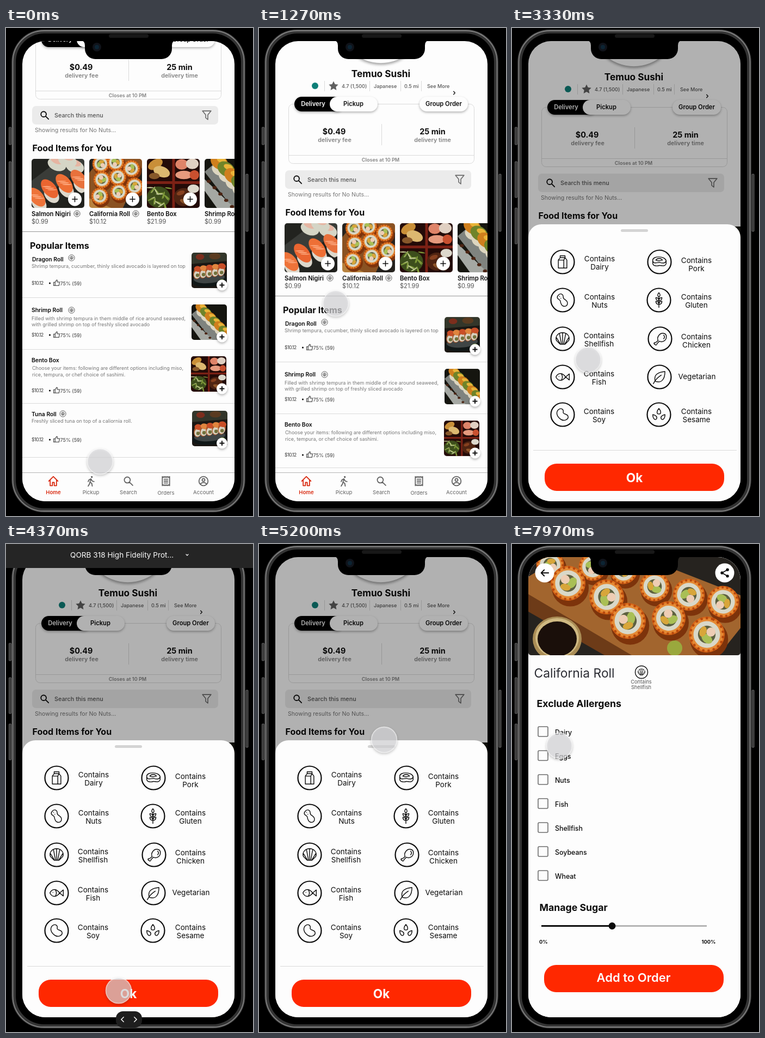
An HTML page that plays this animation: 454x895 px, repeating every 8000 ms.

```html
<!DOCTYPE html>
<html lang="en">
<head>
<meta charset="utf-8">
<title>Food order prototype</title>
<style>
  html, body { margin: 0; width: 100%; height: 100%; overflow: hidden; background: #000; }
  svg { display: block; width: 454px; height: 895px; }
  text { font-family: Inter, "Open Sans", sans-serif; white-space: pre; }
  .raised { filter: drop-shadow(0 2px 2px rgba(0, 0, 0, .3)); }
</style>
</head>
<body>
<svg id="stage" viewBox="0 0 454 895"></svg>
<script>
const LOOP = 8000;
const PAPER = '#fdfdfd', INK = '#0c0c0c', GREY = '#767676', MID = '#555555';
const LINE = '#dadada', RED = '#ff2800';

// ---------- drawing helpers ----------
const rect = (x, y, w, h, r, fill, more = '') =>
  `<rect x="${x}" y="${y}" width="${w}" height="${h}" rx="${r}" fill="${fill}" ${more}/>`;
const circle = (x, y, r, fill, more = '') => `<circle cx="${x}" cy="${y}" r="${r}" fill="${fill}" ${more}/>`;
const oval = (x, y, rx, ry, turn, fill) =>
  `<ellipse rx="${rx}" ry="${ry}" fill="${fill}" transform="translate(${x} ${y}) rotate(${turn})"/>`;
const line = (x1, y1, x2, y2, color = LINE, w = 1) =>
  `<path d="M${x1} ${y1}L${x2} ${y2}" stroke="${color}" stroke-width="${w}"/>`;
const shape = (d, fill) => `<path d="${d}" fill="${fill}"/>`;
const text = (x, y, size, str, weight = 400, color = INK, more = '') =>
  `<text x="${x}" y="${y}" font-size="${size}" font-weight="${weight}" fill="${color}" ${more}>${str}</text>`;
const centred = (x, y, size, str, weight, color) =>
  text(x, y, size, str, weight, color, 'text-anchor="middle"');
const group = (id, body) => `<g id="${id}">${body}</g>`;
const repeat = (n, draw) => Array.from({ length: n }, (_, i) => draw(i)).join('');

// Line icons on a 24 unit grid
const ICONS = {
  home: 'M2 12 12 2l10 10M5 10v12h5v-7h4v7h5V10',
  walk: 'M13 3a1 1 0 1 0 2 0 1 1 0 1 0-2 0M6 13l2-4 4-2 3 5 4 1M12 8l-2 6 4 3 1 6M10 14l-1 4-3 5',
  search: 'M3 9.500a6.500 6.500 0 1 0 13 0 6.500 6.500 0 1 0-13 0M14.500 14.500l7 7',
  receipt: 'M4 2l2 2 2-2 2 2 2-2 2 2 2-2 2 2 2-2v20l-2-2-2 2-2-2-2 2-2-2-2 2-2-2-2 2zM8 8h8M8 12h8M8 16h8',
  person: 'M2 12a10 10 0 1 0 20 0 10 10 0 1 0-20 0M9 9.500a3 3 0 1 0 6 0 3 3 0 1 0-6 0M5.500 19c2-5 11-5 13 0',
  funnel: 'M2 2h20l-7.500 9v11l-5-4v-7z',
  thumb: 'M7 10l5-8c2 0 3 1 2.500 3L14 9h8l-2 12H7zM2 10h5v11H2z',
  plus: 'M12 3v18M3 12h18',
  back: 'M21 12H4M11 5l-7 7 7 7',
  share: 'M18 5 6 12l12 7',
  dots: 'M18 5h.1M6 12h.1M18 19h.1',
  right: 'M8 4l8 8-8 8',
  left: 'M16 4l-8 8 8 8',
  down: 'M4 8l8 8 8-8',
  milk: 'M5 9v13h14V9l-3-4H8zM8 5V2h8v3M5 9h9v13M14 9l2-4',
  peanut: 'M5 4c3-4 8-2 8 3s7 4 7 10-7 7-10 2 0-6-4-8-3-5-1-7zM7 6h.1M9 9h.1',
  shell: 'M8 21h8l6-6c3-7-3-13-10-13S-1 8 2 15zM12 3v17M7 4l3 16M17 4l-3 16M2 10l6 10M22 10l-6 10',
  fish: 'M1 12c4-8 11-7 16 0l6-5v10l-6-5c-5 7-12 8-16 0zM6 11h.1M10 7c2 3 2 7 0 10',
  bean: 'M5 4c5-4 9 0 8 4s7 2 8 7-7 9-13 4S1 8 5 4z',
  meat: 'M1 9c0-7 20-7 22 1v5c-2 6-9 2-12 3s-10 1-10-4zM1 9c0 8 9 3 12 4s9 2 10-3M6 9c3-4 9-3 11 0-3 1-8 2-11 0z',
  wheat: 'M12 24V8M12 7c-3-2-2-5 0-7 2 2 3 5 0 7zM12 13c-4 0-5-2-5-5 3 0 5 2 5 5 0-3 2-5 5-5 0 3-1 5-5 5M12 19c-4 0-5-2-5-5 3 0 5 2 5 5 0-3 2-5 5-5 0 3-1 5-5 5',
  drumstick: 'M9 15c-3-6 3-13 9-12s6 10 0 13c-3 1.500-5 1-7 0l-4 4c0 3-3 3-3 1-2 0-3-3 1-3zM18 6c2 2 2 4 0 6',
  leaf: 'M5 19C2 8 10 4 21 3c0 12-5 20-16 16M2 23C6 15 10 12 15 9',
  seeds: 'M12 2c-4 5-4 9 0 9s4-4 0-9zM2 12c5 1 8 4 6 7s-6 0-6-7zM22 12c-5 1-8 4-6 7s6 0 6-7z'
};
const icon = (name, x, y, size, color = INK, w = 1.6) =>
  `<path d="${ICONS[name]}" fill="none" stroke="${color}" stroke-width="${w * 24 / size}"
    stroke-linecap="round" stroke-linejoin="round"
    transform="translate(${x - size / 2} ${y - size / 2}) scale(${size / 24})"/>`;
const badge = (name, x, y, r, color, w) =>
  circle(x, y, r, 'none', `stroke="${color}" stroke-width="${w}"`) + icon(name, x, y, r * 1.25, color, w * .65);
const contentMark = (x, y) => badge('shell', x, y, 5.6, MID, 1);
const addButton = (x, y, r) =>
  circle(x, y, r, '#fff', 'class="raised"') + icon('plus', x, y, r, INK, r > 11 ? 1.5 : 1.9);

// ---------- food pictures ----------
const cutRoll = (x, y, r, turn = 0) => oval(x + r * .12, y + r * .25, r, r, 0, '#7d330b')
  + `<g transform="translate(${x} ${y}) rotate(${turn}) scale(${r / 10})">
  ${circle(0, 0, 9.4, '#d9691a')}${circle(0, 0, 8.6, '#e58a35', 'stroke="#b8480c" stroke-width="1.3" stroke-dasharray="1.2 1.6"')}
  ${circle(0, 0, 7, '#d9d8c8')}${circle(0, 0, 4.6, '#5d6040')}${oval(-2, .8, 2.2, 3.2, 20, '#a9bf55')}
  ${oval(2, 1.6, 2.4, 2.4, 0, '#eecdb4')}${oval(.8, -2.4, 2.8, 1.8, 0, '#d8a63a')}</g>`;
const nigiri = (x, y, turn, fill) => oval(x + 4, y + 12, 17, 12, turn, '#ddd8cc') + oval(x, y, 21, 12, turn, fill)
  + repeat(3, i => oval(x - 5 + i * 5, y - 4 + i * 3, 9, 1, turn - 50, '#ffad84'));

const FOOD = {
  nigiri: rect(0, 0, 100, 100, 0, '#22231f') + shape('M0 45 60 0h40v20L0 90z', '#3a3c38')
    + [[48, 10], [82, 14], [68, 3]].map(([x, y]) => oval(x, y + 4, 18, 12, 20, '#d5d5c6') + oval(x, y - 3, 12, 6, 20, '#e6b5a2')).join('')
    + nigiri(90, 42, 50, '#e8713c') + nigiri(62, 50, 50, '#ee6f35') + nigiri(34, 60, 50, '#ea6530') + nigiri(10, 76, 50, '#ee7339')
    + shape('M30 100 100 66v34z', '#22221e'),
  california: rect(0, 0, 100, 100, 0, '#26231f') + shape('M0 30 25 0h75v20L62 100H0z', '#8a5222') + shape('M0 78 50 100H0z', '#b8823e')
    + [[22, 13], [50, 10], [80, 22], [24, 43], [54, 38], [86, 55], [56, 66], [20, 74]]
      .map(([x, y], i) => cutRoll(x, y, 17, i * 70)).join(''),
  bento: rect(0, 0, 100, 100, 0, '#240b08') + shape('M0 46h100v5H0zM48 0h5v100h-5z', '#7c2115')
    + oval(22, 76, 22, 20, 0, '#3d4e1c')
    + repeat(22, i => oval(6 + i * 13 % 36, 58 + i * 7 % 38, 7, 1.2, i * 50, i % 3 ? '#7f9a38' : '#c4cc96'))
    + oval(16, 14, 15, 9, -30, '#c98f38') + oval(28, 28, 16, 10, 20, '#dcb870') + oval(14, 36, 10, 6, 0, '#87572a')
    + oval(66, 14, 12, 10, 0, '#df8469') + oval(86, 13, 12, 10, 0, '#e0d0c2') + oval(70, 34, 16, 8, 0, '#e69a7e') + oval(90, 34, 9, 9, 0, '#c9502f')
    + oval(70, 76, 19, 17, 0, '#4f2412') + oval(88, 60, 11, 8, 0, '#ddd8cc') + oval(76, 86, 14, 5, 20, '#92572b') + oval(64, 68, 8, 4, -20, '#86401f'),
  shrimp: rect(0, 0, 100, 100, 0, '#15150f') + shape('M0 28 24 8l76 64v28H56z', '#7f837f') + shape('M0 42 60 100H26L0 64z', '#a5a8a3')
    + repeat(7, i => oval(26 + i * 13, 24 + i * 13, 13, 10, 35, '#ddd6c0') + oval(28 + i * 13, 10 + i * 13, 18, 13, 35, i % 2 ? '#6f8429' : '#cf7f1d')
      + oval(32 + i * 13, 6 + i * 13, 9, 5, 20, '#e9b438'))
    + repeat(5, i => oval(8 + i * 11, 46 + i * 12, 4, 3, 0, '#4b2413')),
  dragon: rect(0, 0, 100, 100, 0, '#1b1713') + shape('M0 0h100v24L0 32z', '#33362a') + oval(24, 12, 12, 8, 0, '#7c2e1d') + oval(66, 10, 16, 9, 0, '#5a3b20')
    + oval(50, 78, 50, 18, -5, '#101717') + oval(50, 72, 44, 14, -5, '#3f4545')
    + repeat(5, i => oval(16 + i * 17, 58 - i * 2, 11, 17, 10, '#a9572a') + oval(16 + i * 17, 62 - i * 2, 9, 11, 10, '#d8d1c0')
      + oval(18 + i * 17, 46 - i * 2, 11, 8, 10, i % 2 ? '#e0853e' : '#c94f28') + oval(17 + i * 17, 64 - i * 2, 5, 5, 0, '#72713c'))
    + oval(86, 80, 8, 5, 0, '#64812f')
};
const patterns = Object.entries(FOOD).map(([id, art]) =>
  `<pattern id="${id}" width="1" height="1" viewBox="0 0 100 100" preserveAspectRatio="xMidYMid slice">${art}</pattern>`).join('');
const photo = (name, x, y, w, h, r = 5) => rect(x, y, w, h, r, `url(#${name})`);

// ---------- restaurant page ----------
const pill = (x, w, fill) => rect(x, 132, w, 27, 13.5, fill, 'class="raised"');

const header = `
  ${circle(224, -10, 81, PAPER, 'class="raised" stroke="#b5b5b5" stroke-width="1.5"')}
  ${centred(224, 95.500, 17.2, 'Temuo Sushi', 700)}
  ${circle(103, 112, 6, '#0d7f78')}
  ${[120, 203, 260, 298].map(x => line(x + .5, 103, x + .5, 122)).join('')}
  ${shape('M137 103.500l2.700 5.500 6 .8-4.400 4.200 1.100 6-5.400-2.900-5.400 2.900 1.100-6-4.400-4.200 6-.8z', '#606060')}
  ${[[152, '4.7 (1,500)'], [211, 'Japanese'], [267, '0.5 mi'], [309, 'See More']].map(([x, s]) => text(x, 115.500, 9.1, s, 500, MID)).join('')}
  ${icon('right', 359, 125, 8, INK, 1.4)}
  ${rect(54.5, 145.5, 341, 109, 8, 'none', `stroke="${LINE}"`)}
  ${line(54, 239.5, 396, 239.5)}${line(225.5, 182, 225.5, 221)}
  ${pill(65, 90, '#000')}${pill(130, 88, PAPER)}${pill(295, 89, PAPER)}
  ${centred(99.5, 149, 11.2, 'Delivery', 600, PAPER)}
  ${centred(173.5, 149, 11.2, 'Pickup', 600)}${centred(339.5, 149, 11.2, 'Group Order', 600)}
  ${centred(138, 201, 14.4, '$0.49', 700)}${centred(319, 201, 14.4, '25 min', 700)}
  ${centred(139, 215, 10.8, 'delivery fee', 600, '#828282')}${centred(319, 215, 10.8, 'delivery time', 600, '#828282')}
  ${centred(223.5, 250.500, 9.1, 'Closes at 10 PM', 600, '#828282')}
  ${rect(48, 267, 342, 34, 7, '#ebebeb')}
  ${icon('search', 71, 284, 18, INK, 1.9)}${text(89, 288, 10.8, 'Search this menu', 500, MID)}
  ${icon('funnel', 369, 284, 19, '#6a6a6a', 1.6)}
  ${text(53, 315, 10.6, 'Showing results for No Nuts...', 400, GREY)}`;

const dishes = [
  ['nigiri', 'Salmon Nigiri', '$0.99', 130.5], ['california', 'California Roll', '$10.12', 238.5],
  ['bento', 'Bento Box', '$21.99'], ['shrimp', 'Shrimp Roll', '$0.99']
].map(([art, name, price, mark], i) => {
  const x = 47 + i * 106;
  return photo(art, x, 364, 97, 90) + addButton(x + 79.5, 438, 12.5) + text(x, 469, 11.2, name, 600)
    + text(x, 483, 11.1, price, 400, MID) + (mark ? contentMark(mark, 464.5) : '');
}).join('');

const menuItem = ({ name, x, y, mark, lines, textX, textY, priceY, art, artX, artY, end }) => `
  ${text(x, y, 10.4, name, 600)}${mark ? contentMark(...mark) : ''}
  ${lines.map((s, i) => text(textX, textY + i * 11.7, 9, s, 400, GREY)).join('')}
  ${text(47, priceY + 3, 8.8, '$10.12', 500, MID, 'letter-spacing="-.7"')}
  ${circle(80.5, priceY, 1.6, INK)}${icon('thumb', 93, priceY - .5, 13, MID, 1.3)}
  ${text(99.5, priceY + 3.5, 9, '75% (59)', 500, MID)}
  ${photo(art, artX, artY, 65, 65)}${addButton(397, artY + 59.5, 10)}
  ${line(30, end, 420, end)}`;

const menu = [
  { name: 'Dragon Roll', x: 48, y: 552, mark: [120.5, 545.5], textX: 47, textY: 564, priceY: 592, art: 'dragon', artX: 341, artY: 536, end: 618.5,
    lines: ['Shrimp tempura, cucumber, thinly sliced avocado is layered on top'] },
  { name: 'Shrimp Roll', x: 47, y: 645, mark: [120.5, 641.5], textX: 47, textY: 659.5, priceY: 687, art: 'shrimp', artX: 341, artY: 631, end: 713.5,
    lines: ['Filled with shrimp tempura in them middle of rice around seaweed,', 'with grilled shrimp on top of freshly sliced avocado'] },
  { name: 'Bento Box', x: 47, y: 737, textX: 48, textY: 751, priceY: 789, art: 'bento', artX: 340, artY: 726, end: 812.5,
    lines: ['Choose your items: following are different options including miso,', 'rice, tempura, or chef choice of sashimi.'] },
  { name: 'Tuna Roll', x: 47, y: 836, mark: [104.5, 831.5], textX: 47, textY: 847.5, priceY: 879, art: 'dragon', artX: 342, artY: 826, end: 911.5,
    lines: ['Freshly sliced tuna on top of a caliornia roll.'] }
].map(menuItem).join('');

const page = group('page', `${header}
  ${text(48.5, 350, 16, 'Food Items for You', 700)}${dishes}
  ${line(30, 497.5, 420, 497.5, '#969696')}
  ${text(44, 529, 16.2, 'Popular Items', 700)}${menu}`);

const nav = rect(30, 815, 390, 60, 0, PAPER) + line(30, 815.5, 420, 815.5, '#b4b4b4')
  + [['home', 'Home'], ['walk', 'Pickup'], ['search', 'Search'], ['receipt', 'Orders'], ['person', 'Account']].map(([art, label], i) => {
    const x = 87 + i * 69, color = i ? '#626262' : '#d92a10';
    return icon(art, x, 831, 20, color, 1.8) + centred(x, i === 3 ? 856 : 855, 9.6, label, i ? 400 : 600, color);
  }).join('');

// ---------- allergen sheet ----------
const legend = [
  ['milk', 'Dairy', 93, 429, 161, 428], ['meat', 'Pork', 271, 429, 339, 431],
  ['peanut', 'Nuts', 93, 499, 161, 498], ['wheat', 'Gluten', 270, 499, 339, 498],
  ['shell', 'Shellfish', 93, 570, 160, 569], ['drumstick', 'Chicken', 272, 570, 339, 571],
  ['fish', 'Fish', 93, 640, 160, 639], ['leaf', '', 271, 640, 340, 644],
  ['bean', 'Soy', 93, 709, 160, 708], ['seeds', 'Sesame', 270, 709, 339, 708]
].map(([art, word, x, y, tx, ty]) => badge(art, x, y, 21.5, INK, 2.2)
  + (word ? centred(tx, ty, 13.5, 'Contains') + centred(tx, ty + 15, 13.5, word) : centred(tx, ty, 13.5, 'Vegetarian'))).join('');

const sheet = group('sheet', `${rect(30, 360, 390, 540, 24, PAPER)}${rect(200, 369, 50, 5, 2.5, '#d4d4d4')}
  ${legend}${line(39, 774.5, 413, 774.5)}
  ${rect(60, 799, 330, 50, 22, RED)}${centred(225, 833, 22.5, 'Ok', 700, PAPER)}`);

// ---------- dish page ----------
const bigRolls = [[70, 38, 27], [148, 42, 27], [205, 48, 27], [103, 72, 34], [262, 78, 29], [174, 97, 34], [325, 93, 31],
  [388, 106, 31], [213, 141, 35], [288, 136, 33], [358, 166, 35]].map(([x, y, r], i) => cutRoll(x, y, r, i * 65)).join('');
const checks = ['Dairy', 'Eggs', 'Nuts', 'Fish', 'Shellfish', 'Soybeans', 'Wheat'].map((label, i) =>
  rect(48, 335 + i * 44, 18, 18, 2, 'none', 'stroke="#6d6d6d" stroke-width="1.6"') + text(79, 349.5 + i * 44, 12.4, label, 500)).join('');

const dish = group('dish', `${rect(30, 24, 390, 850, 0, PAPER)}
  <g clip-path="url(#hero)">${rect(30, 24, 390, 180, 0, '#26231f')}
    ${shape('M30 60 90 24h150l180 70v60l-40 50H190L30 120z', '#a2652e')}${shape('M30 92 220 204h-50L30 124z', '#6d3b18')}
    ${bigRolls}${oval(83, 174, 45, 41, 0, '#a98c55')}${oval(83, 172, 40, 36, 0, '#cfb982')}${oval(83, 174, 36, 32, 0, '#1a0f0a')}
    ${circle(299, 191, 14, '#9aa83d')}</g>
  ${circle(60, 53, 17.5, '#fff')}${icon('back', 60, 53, 19, INK, 2)}
  ${circle(391, 53, 17.5, '#fff')}${icon('share', 391, 53, 20, INK, 1.8)}${icon('dots', 391, 53, 20, INK, 5.4)}
  ${text(40.5, 245, 22.8, 'California Roll', 400, '#2b2c33')}
  ${badge('shell', 238, 235, 11.5, INK, 1.4)}
  ${centred(237.5, 256, 9.2, 'Contains', 400, MID)}${centred(237.5, 266, 9.2, 'Shellfish', 400, MID)}
  ${text(45.5, 298.5, 17.7, 'Exclude Allergens', 700)}${checks}
  ${text(50.5, 672.5, 17.7, 'Manage Sugar', 700)}
  ${line(184, 700.5, 358, 700.5, '#b4b4b4', 3)}${line(54, 700.5, 184, 700.5, INK, 3)}${circle(184, 700.5, 6.5, INK)}
  ${text(50, 733, 9.3, '0%', 700)}${text(348.5, 733, 9.3, '100%', 700)}
  ${rect(59, 772, 330, 50, 22, RED)}${centred(223.5, 802.5, 22, 'Add to Order', 600, PAPER)}`);

// ---------- phone and viewer chrome ----------
const sideButton = (x, y, h) => rect(x, y, 4, h, 1, '#333', 'stroke="#7c7c7c" stroke-width=".8"');
const body = [[5.5, 182, 32], [5.5, 245, 66], [5.5, 330, 66], [441, 268, 105]].map(b => sideButton(...b)).join('')
  + rect(10, 2.5, 430, 886, 60, '#343434')
  + rect(12.5, 5, 425, 881, 57, 'none', 'stroke="#818181" stroke-width="1.8"')
  + rect(18, 10, 414, 871, 52, '#000') + rect(189, 11, 73, 7, 3.5, '#181818');
const notch = shape('M137 23q8 0 8 9v6a19 19 0 0 0 19 19h122a19 19 0 0 0 19-19v-6q0-9 8-9z', '#000')
  + circle(167, 35, 8, '#10131a') + circle(167, 35, 4, '#0c2433');
const chrome = group('chrome', `${rect(0, 0, 454, 44, 0, '#252525')}
  ${text(118, 25, 13.6, 'QORB 318 High Fidelity Prot...', 400, PAPER)}${icon('down', 333, 20, 6, PAPER, 1.2)}
  ${rect(202, 857, 48, 30, 13, '#1e1e1e')}${icon('left', 214, 872, 13, PAPER, 1.5)}${icon('right', 238, 872, 13, PAPER, 1.5)}`);
const touch = group('touch', circle(0, 0, 23.5, 'rgba(226,226,230,.66)', 'class="raised" stroke="rgba(255,255,255,.6)" stroke-width="1.5"'));

document.getElementById('stage').innerHTML = `
  <defs>${patterns}
    <clipPath id="screen">${rect(30, 24, 390, 844, 42, '#000')}</clipPath>
    <clipPath id="hero">${rect(30, 10, 390, 194, 5, '#000')}</clipPath></defs>
  ${rect(0, 0, 454, 895, 0, '#000')}${body}
  <g clip-path="url(#screen)">${rect(30, 24, 390, 844, 0, PAPER)}${page}${nav}
    <rect id="dim" x="30" y="24" width="390" height="844" fill="#000"/>${sheet}${dish}</g>
  ${notch}${chrome}${touch}`;

// ---------- motion: [ms, value, easing towards the next step] ----------
const play = (id, prop, steps) => {
  const last = steps[steps.length - 1];
  const frames = [...steps, [LOOP, last[1]]].map(([ms, value, easing = 'linear']) => ({ offset: ms / LOOP, [prop]: value, easing }));
  document.getElementById(id).animate(frames, { duration: LOOP, iterations: Infinity });
};
const at = (x, y) => `translate(${x}px, ${y}px)`;
const HOLD = 'steps(1, end)', SMOOTH = 'ease-in-out';

play('touch', 'transform', [
  [0, at(173, 795), SMOOTH], [700, at(156, 387)], [930, at(152, 435)], [1300, at(140, 511)],
  [1500, at(128, 547)], [2130, at(125, 547), SMOOTH], [2450, at(120, 546)], [3000, at(120, 546), SMOOTH],
  [4000, at(207, 819)], [4450, at(207, 819), SMOOTH], [5150, at(230, 359)], [5550, at(230, 359), SMOOTH],
  [6400, at(220, 461)], [6600, at(220, 461), SMOOTH], [6900, at(205, 415)], [7200, at(205, 415), SMOOTH], [7900, at(87, 370)]
]);
play('page', 'transform', [[0, at(0, -124)], [700, at(0, -124)], [930, at(0, -76)], [1300, at(0, 0)]]);
play('sheet', 'transform', [
  [0, at(0, 520)], [2800, at(0, 520), 'ease-out'], [3100, at(0, 0)], [5500, at(0, 0), 'ease-out'], [5800, at(0, 520)]
]);
play('dim', 'opacity', [[0, 0], [2800, 0], [3000, .3], [5500, .3], [5700, 0]]);
play('chrome', 'opacity', [[0, 0], [3850, 0], [4000, 1], [4600, 1], [4750, 0]]);
play('dish', 'visibility', [[0, 'hidden', HOLD], [7150, 'visible', HOLD]]);
</script>
</body>
</html>
```
